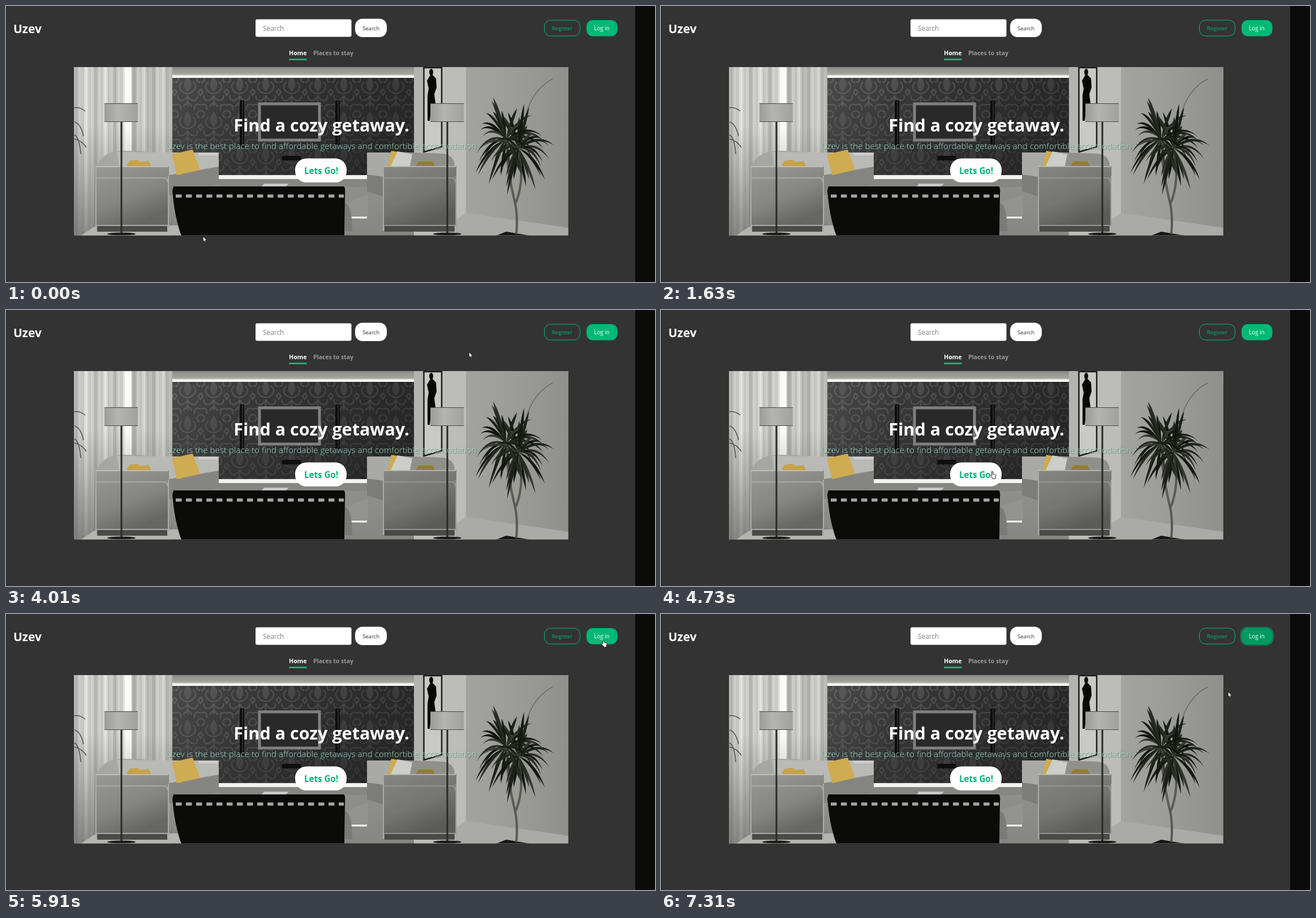
These frames come from a looping animation (1147 by 488 pixels, 8000 ms). An HTML page:

```html
<!DOCTYPE html>
<html lang="en">
<head>
<meta charset="utf-8">
<title>Cozy getaway</title>
<style>
  html, body { margin: 0; height: 100%; overflow: hidden; background: #333; }
  svg { display: block; width: 100vw; height: 100vh; }
  text { font-family: "Open Sans", "Noto Sans", sans-serif; }
  .bold { font-weight: 700; }
  .mid { text-anchor: middle; }
  .lead { font-weight: 300; text-shadow: 1px 1px 1px #1237; }
</style>
</head>
<body>
<svg viewBox="0 0 1147 488">
  <defs>
    <clipPath id="frame"><rect x="120.5" y="108" width="873" height="297.5"/></clipPath>
    <pattern id="damask" width="46" height="62" x="298" y="122" patternUnits="userSpaceOnUse">
      <g fill="none" stroke="#68686a" stroke-width="2.5" stroke-linecap="round">
        <path fill="#5f5f61" stroke="none" d="M23 2C32 13 31 22 23 30C15 22 14 13 23 2Z"/>
        <path d="M23 33C37 31 41 18 33 13M23 33C9 31 5 18 13 13M23 37C31 50 42 45 40 37M23 37C15 50 4 45 6 37M23 40V55M23 48L30 55M23 48L16 55"/>
        <path d="M1 1C9 4 8 12 2 13M45 1C37 4 38 12 44 13M1 53C8 50 12 55 11 61M45 53C38 50 34 55 35 61M0 25L4 30L0 36M46 25L42 30L46 36"/>
      </g>
    </pattern>
    <linearGradient id="ceiling" x2="0" y2="1">
      <stop stop-color="#8b8b87"/><stop offset=".65" stop-color="#a3a39f"/><stop offset=".85" stop-color="#fff"/>
    </linearGradient>
    <linearGradient id="wall">
      <stop stop-color="#4d4d4e"/><stop offset=".35" stop-color="#3d3d3e"/><stop offset="1" stop-color="#29292a"/>
    </linearGradient>
    <linearGradient id="wallShade" x2="1" y2=".6">
      <stop stop-color="#303031" stop-opacity=".1"/><stop offset=".45" stop-color="#2b2b2c" stop-opacity=".5"/>
      <stop offset="1" stop-color="#252526" stop-opacity=".8"/>
    </linearGradient>
    <linearGradient id="floor" x2="0" y2="1">
      <stop stop-color="#ddd"/><stop offset=".7" stop-color="#8f8f8b"/><stop offset="1" stop-color="#868682"/>
    </linearGradient>
    <linearGradient id="curtainShade" x2="0" y2="1">
      <stop offset=".35" stop-color="#555552" stop-opacity="0"/><stop offset="1" stop-color="#555552" stop-opacity=".6"/>
    </linearGradient>
    <linearGradient id="rightWall">
      <stop stop-color="#a3a39f"/><stop offset=".5" stop-color="#9b9b97"/><stop offset="1" stop-color="#8f8f8b"/>
    </linearGradient>
    <linearGradient id="arm" x2=".5" y2="1">
      <stop stop-color="#999996"/><stop offset=".6" stop-color="#858582"/><stop offset="1" stop-color="#666663"/>
    </linearGradient>
    <linearGradient id="shade">
      <stop stop-color="#9b9b97"/><stop offset=".4" stop-color="#b4b4b0"/><stop offset="1" stop-color="#a0a09c"/>
    </linearGradient>
    <g id="lamp">
      <rect x="-1.5" y="33" width="3" height="197" fill="#292927"/>
      <ellipse cy="231" rx="25" ry="2.5" fill="#191918"/>
      <rect x="-30" width="59" height="33" fill="url(#shade)"/>
      <path d="M-30 .5H29M-30 32.5H29" stroke="#4b4b48"/>
    </g>
    <g id="armBox">
      <path d="M3 389H127V399H3Z" fill="#4a4a47"/>
      <rect y="283" width="130" height="105" fill="url(#arm)"/>
      <path d="M1 283V398M129 300V398M1 304H122Q128 304 128 312M2 388H128" fill="none" stroke="#aaaaa6" stroke-width="2"/>
      <path d="M1 284H129" stroke="#bdbdb9" stroke-width="2"/>
    </g>
  </defs>

  <rect width="1147" height="488" fill="#333"/>
  <rect width="1" height="488" fill="#1d1b52"/>
  <rect x="1112" width="35" height="488" fill="#0b0b09"/>

  <g clip-path="url(#frame)">
    <rect x="120" y="108" width="874" height="298" fill="url(#floor)"/>
    <g id="curtains"></g>
    <rect x="120" y="108" width="174" height="298" fill="url(#curtainShade)"/>
    <path d="M132 406L160 388H310V406Z" fill="#b4b4b0"/>
    <path d="M121 180Q130 178 140 186M121 205Q132 208 137 230M121 235Q134 238 142 250M121 228Q130 232 132 262" fill="none" stroke="#50504d" stroke-width="1.5"/>

    <rect x="294" y="108" width="428" height="19" fill="url(#ceiling)"/>
    <rect x="294" y="127" width="428" height="172" fill="url(#wall)"/>
    <rect x="294" y="127" width="428" height="172" fill="url(#damask)"/>
    <rect x="294" y="127" width="428" height="172" fill="url(#wallShade)"/>
    <path d="M413 167h8v83h-8zM582 167h8v78h-8zM488 265h33v8h-33z" fill="#0e0e0e"/>
    <path d="M418 168V249M587 168V244" stroke="#444"/>
    <rect x="448" y="173" width="106" height="64" fill="#29292a" stroke="#80807e" stroke-width="5"/>
    <path d="M375 299H640V320H375Z" fill="#868682"/>
    <path d="M375 299H640V306H375Z" fill="#f3f3f0"/>
    <path d="M456 314H500L495 319H452Z" fill="#c9c9c5"/>
    <path d="M599 348L640 334V372H599Z" fill="#93938f"/>
    <path d="M599 374H638" stroke="#fff" stroke-width="3"/>
    <path d="M599 348Q612 352 612 398H599Z" fill="#7a7a77"/>

    <rect x="721" y="108" width="93" height="298" fill="#bcbcb8"/>
    <rect x="721" y="108" width="16" height="150" fill="#b3b3af"/>
    <path d="M738.5 109H770V249L738.5 258Z" fill="#c9c9c5" stroke="#1c1c1b" stroke-width="2.5"/>
    <ellipse cx="751.5" cy="117" rx="3.5" ry="6" fill="#080808"/>
    <path d="M750 122H754L760 128L761 144L757 156L759 172L756 203H753L752 172L749 203H745L745 158L747 146L744 132Z" fill="#080808"/>
    <rect x="813" y="108" width="181" height="298" fill="url(#rightWall)"/>
    <path d="M795 378L813 366L994 392V406H795Z" fill="#aaaaa6"/>
    <path d="M866 406L884 399L926 406Z" fill="#141414"/>

    <path d="M160 284Q170 257 205 256H240L296 272V330H160Z" fill="#a6a6a2"/>
    <path d="M196 258L290 259H376V300L288 330V284H200Z" fill="#b9b9b5"/>
    <path d="M288 299L376 284V316L288 335Z" fill="#858582"/>
    <path d="M340 260H376V264H340Z" fill="#cececa"/>
    <path d="M213 283L218 274L232 272L238 276L252 274L256 283Z" fill="#c6a347"/>
    <path d="M293 262L330 254L343 290L302 299Z" fill="#cfab52"/>
    <use href="#armBox" x="158"/>

    <path d="M638 259H690L700 283L667 285V338L638 328Z" fill="#a9a9a5"/>
    <path d="M690 258L772 261Q793 264 793 284H690Z" fill="#8f8f8b"/>
    <path d="M638 298L668 302V338L638 328Z" fill="#7c7c79"/>
    <path d="M675 283L681 256L692 258L686 283Z" fill="#cfab4e"/>
    <path d="M680 283L692 257L718 262L714 283Z" fill="#cdcdc9"/>
    <path d="M724 283L729 275L754 275L758 283Z" fill="#927c3c"/>
    <use href="#armBox" x="666"/>
    <rect x="668" y="284" width="128" height="105" fill="#222" opacity=".16"/>
    <use href="#lamp" x="204" y="172"/>
    <use href="#lamp" x="780" y="172"/>

    <path d="M296 319H597Q600 320 599 333L598 406H310Q298 375 294 326Z" fill="#0b0b0a"/>
    <path d="M300 336H597" stroke="#a5a5a2" stroke-width="5.5" stroke-dasharray="10.5 7.5"/>
    <g id="plant">
      <path d="M902 403Q905 370 899 345Q892 318 884 260M900 350Q914 320 910 270" fill="none" stroke="#5a5a50" stroke-width="4"/>
      <path d="M915 210Q925 150 966 129" fill="none" stroke="#6c6c67" stroke-width="1.5"/>
    </g>
  </g>

  <text class="bold" x="13" y="48" font-size="21" fill="#fff">Uzev</text>
  <rect x="441" y="23.5" width="169.5" height="31" rx="3" fill="#fff"/>
  <text x="454" y="44" font-size="11.9" fill="#7b8288">Search</text>
  <rect x="617" y="22.5" width="56" height="32.5" rx="13" fill="#fff"/>
  <text class="mid" x="645" y="43" font-size="9.6" fill="#333">Search</text>
  <rect x="951.5" y="25" width="63" height="28" rx="11" fill="none" stroke="#02b875"/>
  <text class="mid" x="983" y="43" font-size="9.6" fill="#02b875">Register</text>
  <rect id="login" x="1026" y="25" width="54.5" height="28.5" rx="11" stroke="#18724f" paint-order="stroke"/>
  <text class="mid" x="1053" y="43" font-size="9.9" fill="#fff">Log in</text>
  <text class="bold" x="500" y="87" font-size="10.7" fill="#fff">Home</text>
  <rect x="500" y="93" width="31.5" height="3" fill="#02b875"/>
  <text class="bold" x="543" y="87" font-size="10.4" fill="#999">Places to stay</text>

  <text class="bold mid" x="557.5" y="222" font-size="30.5" fill="#fff">Find a cozy getaway.</text>
  <text class="lead mid" x="557" y="253" font-size="15.2" fill="#a9e6cb">Uzev is the best place to find affordable getaways and comfortible accomodation</text>
  <rect x="511" y="269.5" width="91" height="42.5" rx="20" fill="#fff"/>
  <text class="bold mid" x="557" y="297" font-size="15.1" fill="#02b26f">Lets Go!</text>

  <g id="cursor" fill="#fff" stroke="#111" stroke-width=".8" stroke-linejoin="round">
    <path id="arrow" d="M.3 .3V9.6L2.4 7.8L3.9 11L5.4 10.3L4 7.3H6.8Z"/>
    <path id="hand" d="M3 7.5V1.4Q4 0 5 1.4V5L9 6Q10.2 6.4 10 8L9.2 11V13.4H4V12L.8 8.4Q.3 6.8 1.8 7Z"/>
  </g>
</svg>
<script>
const $ = id => document.getElementById(id);
const LOOP = 8000;

function add(parent, tag, attrs) {
  const node = document.createElementNS("http://www.w3.org/2000/svg", tag);
  for (const key in attrs) node.setAttribute(key, attrs[key]);
  parent.append(node);
}

let seed = 7;
const random = () => (seed = seed * 16807 % 2147483647) / 2147483647;

// Curtain folds, with the bright window gap between the two panels
for (let x = 120; x < 294; x += 3) {
  const inGap = x >= 210 && x < 222;
  const base = x < 210 ? 202 : 192;
  const v = inGap ? 250 : Math.round(base + 14 * Math.sin(x * .55) + 14 * Math.sin(x * .19));
  add($("curtains"), "rect", { x, y: 108, width: 3.2, height: 298, fill: `rgb(${v},${v},${v - 4})` });
}

// Two crowns, each a fan of long arching leaves
const crowns = [[884, 236], [906, 252]];
for (let i = 0; i < 64; i++) {
  const [cx, cy] = crowns[i % 2];
  const angle = i * 2.4 + random() * .4;
  const length = 42 + random() * 44;
  const dx = Math.cos(angle) * length * .8, dy = Math.sin(angle) * length;
  const droop = 16 * Math.abs(Math.cos(angle));
  const bend = side => `${cx + dx * .6 + side * dy / length} ${cy + dy * .6 - droop - side * dx / length}`;
  add($("plant"), "path", {
    d: `M${cx} ${cy}Q${bend(5)} ${cx + dx} ${cy + dy + droop}Q${bend(-5)} ${cx} ${cy}`,
    fill: ["#11160f", "#1b2118", "#262c21", "#343b2d"][i % 7 % 4]
  });
}

// Pointer samples: time, x, y, shape; without a shape it is hidden
const samples = [
  [0, 348, 407, "arrow"], [120, 0, 0],
  [1030, 487, 477, "arrow"], [1150, 410, 440, "arrow"], [1270, 280, 400, "arrow"],
  [1390, 130, 362, "arrow"], [1510, 16, 343, "arrow"], [1630, 0, 0],
  [2650, 42, 259, "arrow"], [2800, 106, 311, "arrow"], [2950, 101, 285, "arrow"],
  [3100, 190, 252, "arrow"], [3220, 380, 190, "arrow"], [3340, 580, 128, "arrow"],
  [3460, 750, 84, "arrow"], [3580, 814, 69, "arrow"], [3730, 0, 0],
  [4010, 818, 74, "arrow"], [4130, 819, 74, "arrow"], [4280, 803, 95, "arrow"],
  [4430, 706, 174, "arrow"], [4580, 620, 250, "arrow"],
  [4730, 582, 285, "hand"], [4850, 575, 290, "hand"], [4970, 572, 291, "hand"], [5110, 562, 290, "hand"],
  [5400, 690, 258, "arrow"], [5520, 842, 197, "arrow"], [5660, 950, 118, "arrow"],
  [5790, 1030, 62, "arrow"], [5910, 1052, 45, "hand"],
  [7040, 1036, 82, "arrow"], [7160, 1013, 125, "arrow"], [7310, 1002, 137, "arrow"]
];

function draw(now) {
  const t = now % LOOP;
  const [, x, y, shape] = samples.findLast(sample => sample[0] <= t);
  $("cursor").setAttribute("transform", `translate(${x} ${y})`);
  for (const id of ["arrow", "hand"]) $(id).style.display = id === shape ? "" : "none";

  // The login button darkens and gains its focus ring in three steps
  const focus = [6050, 6170, 6300].filter(time => t >= time).length / 3;
  $("login").setAttribute("fill", `rgb(2,${184 - 30 * focus},${117 - 20 * focus})`);
  $("login").setAttribute("stroke-width", 5 * focus);
  requestAnimationFrame(draw);
}
requestAnimationFrame(draw);
</script>
</body>
</html>
```
